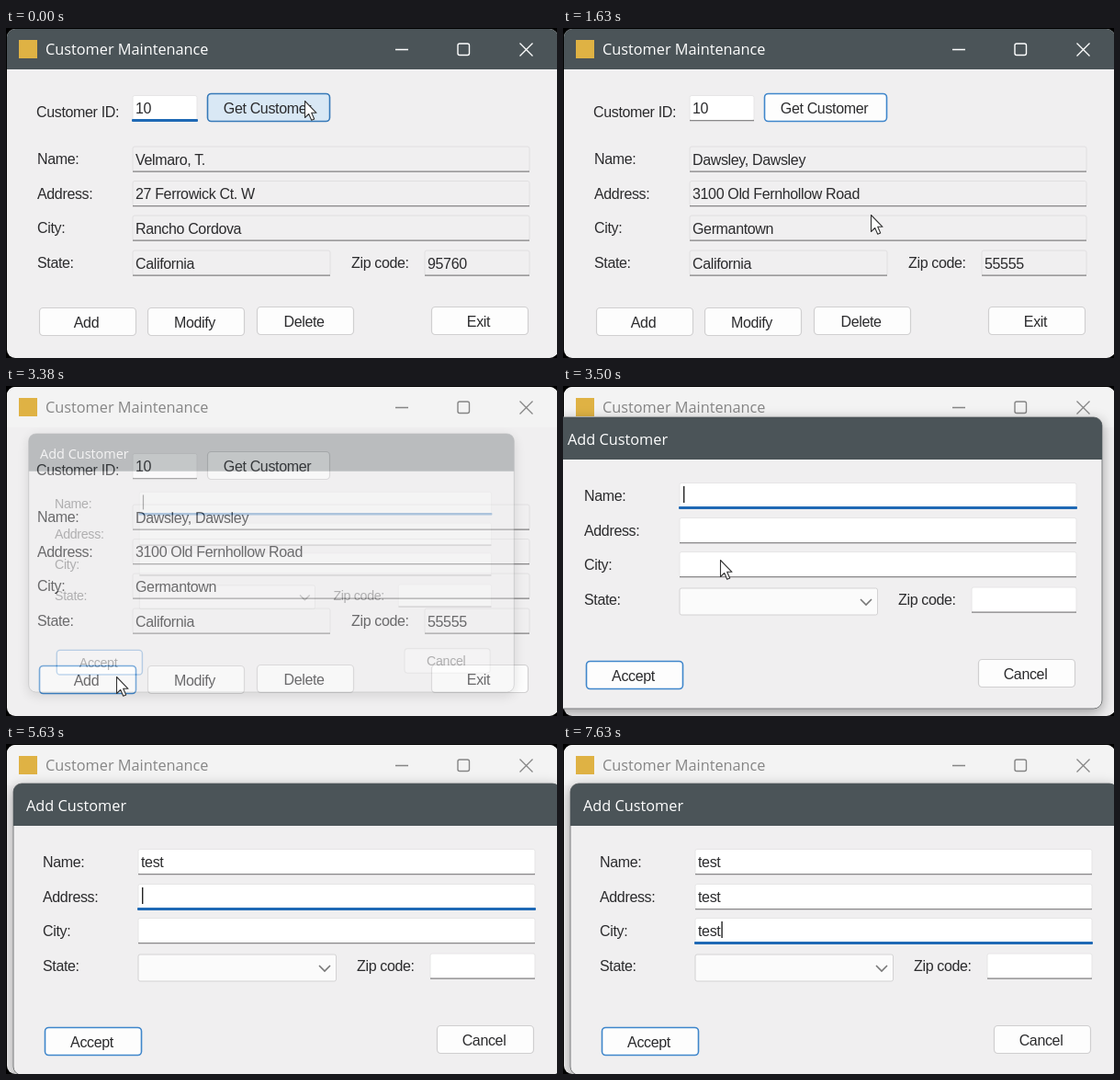
An HTML page for the animation above (8 s loop, 600 px wide and 359 px high).

```html
<!DOCTYPE html>
<html lang="en">
<head>
<meta charset="utf-8">
<title>Customer Maintenance</title>
<style>
  html, body { margin: 0; width: 100%; height: 100%; overflow: hidden; background: #000; }
  svg { display: block; width: 600px; height: 359px; }
  text { font: 16px "Liberation Sans", Arial, sans-serif; letter-spacing: -.35px; fill: #2b2b2d; white-space: pre; }
  .title { font: 16.3px "Open Sans", "Noto Sans", sans-serif; letter-spacing: 0; }
  .mid { text-anchor: middle; }
</style>
</head>
<body>
<svg id="stage" viewBox="0 0 600 359"></svg>
<script>
const LOOP = 8000, STEP = 125;
const stage = document.getElementById('stage');
const pen = document.createElement('canvas').getContext('2d');
pen.font = '16px "Liberation Sans", Arial, sans-serif';
const textWidth = s => pen.measureText(s).width - .35 * s.length;

// Pointer tip: time, x, y
const POINTER = [
  [0, 325, 79], [875, 326, 81], [1125, 330, 112], [1375, 336, 176], [1625, 335, 203],
  [1750, 298, 218], [2000, 216, 262], [2250, 136, 314], [2375, 122, 322], [2625, 124, 316],
  [3375, 120, 316], [3625, 222, 62], [3750, 228, 66], [4000, 245, 75], [4125, 248, 43]
];
// Dialog corner: time, x, y
const DIALOG = [[3375, -9, 34], [3750, -9, 34], [4000, 8, 43]];
const T = { click: 125, loaded: 250, addClick: 2875, open: 3375, opened: 3500, hidePointer: 4375 };

// Focused dialog row: start of focus, then the time of each typed letter
const ROWS = [
  { label: 'Name:', cy: 128, focus: 3375, keys: [4375, 4625, 4750, 4875] },
  { label: 'Address:', cy: 166, focus: 5500, keys: [5750, 5875, 6000, 6125] },
  { label: 'City:', cy: 203, focus: 6875, keys: [7250, 7375, 7500, 7625] }
];
const WORD = 'test';
const BEFORE = ['Velmaro, T.', '27 Bellingham Ct. W', 'Rancho Cordova', '95760'];
BEFORE[1] = '27 Ferrowick Ct. W';
const AFTER = ['Dawsley, Dawsley', '3100 Old Fernhollow Road', 'Germantown', '55555'];

function along(track, t) {
  if (t <= track[0][0]) return track[0].slice(1);
  for (let i = 1; i < track.length; i++) {
    const [t0, x0, y0] = track[i - 1], [t1, x1, y1] = track[i];
    if (t <= t1) {
      const k = (t - t0) / (t1 - t0);
      return [x0 + (x1 - x0) * k, y0 + (y1 - y0) * k];
    }
  }
  return track[track.length - 1].slice(1);
}

const rect = (x, y, w, h, fill, more = '') =>
  `<rect x="${x}" y="${y}" width="${w}" height="${h}" fill="${fill}" ${more}/>`;
const text = (x, y, s, more = '') => `<text x="${x}" y="${y}" ${more}>${s}</text>`;
const label = (x, cy, s) => text(x, cy + 6, s);

function field(x, cy, w, value = '', { edit = false, focus = false } = {}) {
  const y = cy - 13.5;
  return rect(x, y, w, 27, edit ? '#fff' : '#f0eff0', `rx="2" stroke="${edit ? '#e6e5e6' : '#e0dfe0'}"`) +
    (focus ? rect(x - 1, y + 25.5, w + 2, 3, '#1f69b5', 'rx="1"') : rect(x, y + 26.5, w, 1.3, '#8a898a')) +
    text(x + 3, cy + 6, value);
}

function button(x, y, w, s, { hot = false, focus = false } = {}) {
  const line = hot ? '#3679b8' : focus ? '#3f86cb' : '#d0cfd0';
  return rect(x + .5, y + .5, w - 1, 30, hot ? '#d9e8f5' : '#fdfdfd',
      `rx="4" stroke="${line}" stroke-width="${hot || focus ? 1.6 : 1.2}"`) +
    text(x + w / 2 - 1.5, y + 21.5, s, 'class="mid"');
}

function mainWindow(t, [px, py]) {
  const active = t < T.open;
  const ink = active ? '#fff' : '#858585';
  const over = (x, y, w) => active && px >= x && px <= x + w && py >= y && py <= y + 31;
  const [name, street, city, zip] = t < T.loaded ? BEFORE : AFTER;
  const clicked = t >= T.click, added = t >= T.addClick;
  return `<g clip-path="url(#win)">` +
    rect(0, 0, 601, 359, '#f0eff0') +
    rect(0, 0, 601, 45, active ? '#4b5458' : '#f3f3f3') +
    rect(14, 13, 20, 20, '#dfb244') +
    text(43, 29, 'Customer Maintenance', `class="title" style="fill:${ink}"`) +
    `<path d="M424 23.5h14M559.5 16.5l14 14m0-14l-14 14" stroke="${ink}" stroke-width="1.3" fill="none"/>` +
    rect(492, 17, 12.5, 12.5, 'none', `rx="2" stroke="${ink}" stroke-width="1.4"`) +
    label(33, 91, 'Customer ID:') +
    field(138, 87, 70, '10', { edit: true, focus: !clicked }) +
    button(219, 71, 134, 'Get Customer', { hot: over(219, 71, 134), focus: !added }) +
    label(34, 142, 'Name:') + field(138, 142.5, 432, name) +
    label(34, 180, 'Address:') + field(138, 180, 432, street) +
    label(34, 217, 'City:') + field(138, 217.5, 432, city) +
    label(34, 255, 'State:') + field(138, 255.5, 215, 'California') +
    label(376, 255, 'Zip code:') + field(456, 255.5, 114, zip) +
    button(36, 304, 106, 'Add', { hot: over(36, 304, 106), focus: added }) +
    button(154, 304, 106, 'Modify') +
    button(273, 303, 106, 'Delete') +
    button(463, 303, 106, 'Exit') + '</g>';
}

function dialogRow(row, i, t) {
  const next = ROWS[i + 1];
  const focus = t >= row.focus && !(next && t >= next.focus);
  const typed = row.keys.filter(k => k <= t);
  const value = WORD.slice(0, typed.length);
  const since = t - (typed.length ? typed[typed.length - 1] : row.focus);
  const caret = focus && since % 1060 < 530;
  return label(40, row.cy, row.label) + field(144, row.cy, 432, value, { edit: true, focus }) +
    (caret ? rect(148 + textWidth(value), row.cy - 10, 1.4, 18, '#222') : '');
}

function dialog(t) {
  if (t < T.open) return '';
  const [x, y] = along(DIALOG, t);
  const opening = t < T.opened;
  const scale = opening ? .887 : 1;
  // Drawn at its resting corner (8, 43), then scaled about its middle
  return `<g opacity="${opening ? .32 : 1}" transform="translate(${x - 8} ${y - 43})
      translate(306 201.5) scale(${scale}) translate(-306 -201.5)">` +
    rect(8, 43, 596, 317, '#f0eff0', 'rx="9" stroke="#77797a" filter="url(#shade)"') +
    '<path d="M8 89V52a9 9 0 0 1 9-9H595a9 9 0 0 1 9 9V89z" fill="#4b5458"/>' +
    text(22, 73, 'Add Customer', 'class="title" style="fill:#fff"') +
    ROWS.map((row, i) => dialogRow(row, i, t)).join('') +
    label(40, 241, 'State:') +
    rect(144, 229, 215.5, 29, '#fbfbfb', 'rx="2" stroke="#d3d2d3"') +
    '<path d="M341 241l6 6 6-6" fill="none" stroke="#777" stroke-width="1.6"/>' +
    label(382, 241, 'Zip code:') + field(462, 241.5, 114, '', { edit: true }) +
    button(42, 308, 106, 'Accept', { focus: true }) +
    button(469, 306, 106, 'Cancel') + '</g>';
}

const pointer = (t, [x, y]) => t >= T.hidePointer ? '' :
  `<path transform="translate(${x} ${y})" d="M.5 .5V18.5l4.2-4 3 6.8 3-1.3-3-6.7H13z"
    fill="#fff" stroke="#333" stroke-width="1.1" stroke-linejoin="round"/>`;

const DEFS = `<defs><clipPath id="win"><rect x="1" y="1" width="600" height="358" rx="9"/></clipPath>
  <filter id="shade" x="-10%" y="-10%" width="120%" height="120%">
  <feDropShadow dx="0" dy="4" stdDeviation="7" flood-color="#000" flood-opacity=".35"/></filter></defs>`;

let shown = -1;
function tick(now) {
  const t = Math.floor(now % LOOP / STEP) * STEP;
  if (t !== shown) {
    shown = t;
    const at = along(POINTER, t);
    stage.innerHTML = DEFS + mainWindow(t, at) + dialog(t) + pointer(t, at);
  }
  requestAnimationFrame(tick);
}
tick(performance.now());
</script>
</body>
</html>
```
